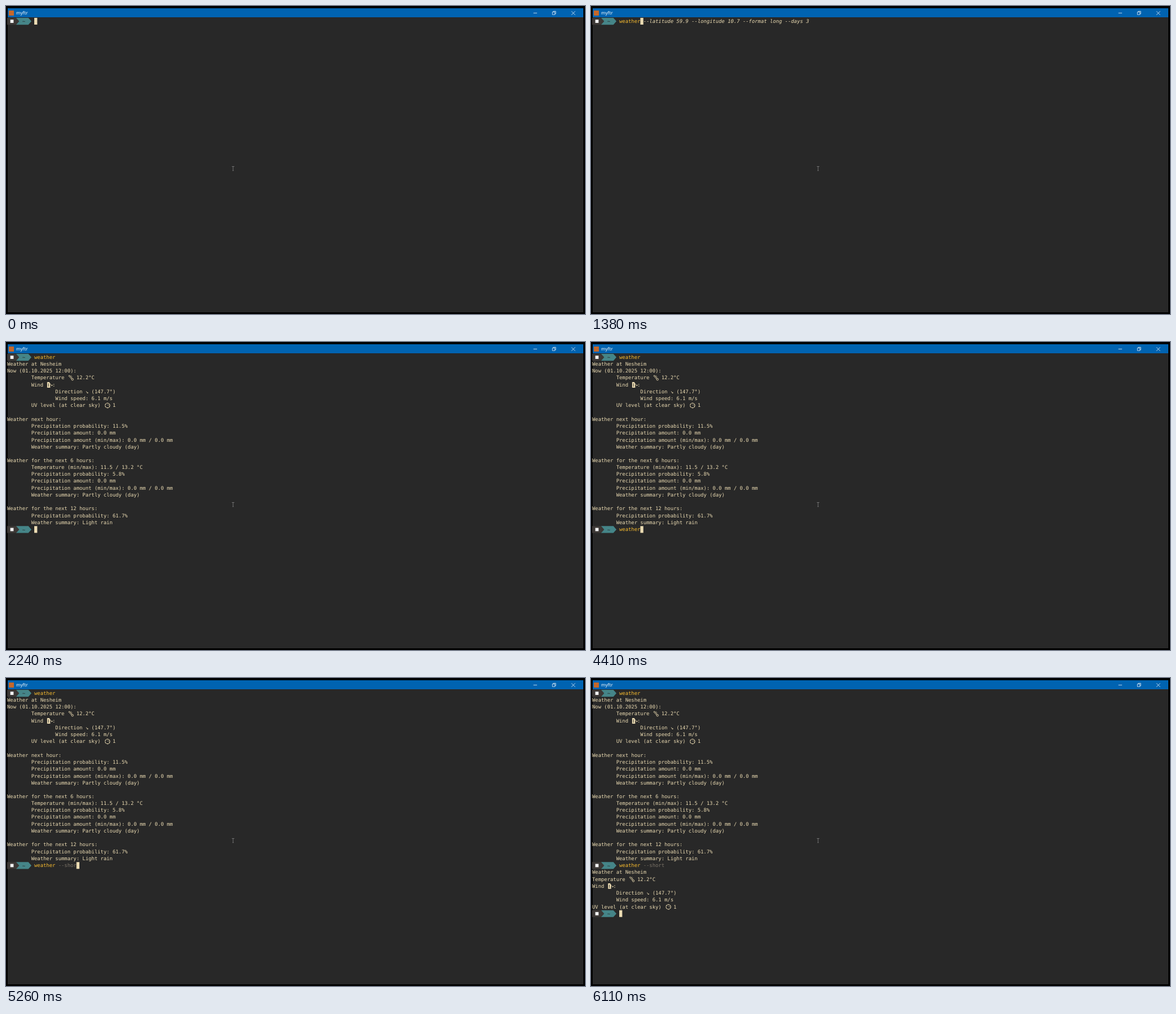
Write an HTML page that moves like this. It is 1025 px wide and 546 px high and loops after 8 s.

```html
<!DOCTYPE html>
<html lang="en">
<head>
<meta charset="utf-8">
<title>Weather in the terminal</title>
<style>
  html, body { margin: 0; width: 100%; height: 100%; overflow: hidden; background: #000; }
  .window { position: absolute; left: 3px; top: 4px; width: 1019px; height: 539px; background: #282828; }
  .bar { position: absolute; left: 0; top: 0; width: 100%; height: 16px; background: #0063b1; }
  .icon { position: absolute; left: 1.5px; top: 3.5px; width: 9.5px; height: 9.5px; background: #c4682c; }
  .title {
    position: absolute; left: 15px; top: 0; line-height: 17px; color: #fff;
    font-family: "Noto Sans", "Open Sans", sans-serif; font-size: 8px; text-rendering: geometricPrecision;
  }
  .overlay { position: absolute; left: 0; top: 0; }

  /* The grid is laid out large, with whole-pixel cells, and scaled down. */
  #screen {
    --row: 27.48px;
    position: absolute; left: 2.3px; top: 20.8px; width: 2280px;
    transform: scale(.444444); transform-origin: 0 0;
    font-family: "DejaVu Sans Mono", "Noto Sans Mono", monospace; font-size: 20px; letter-spacing: -.041px;
    line-height: var(--row); color: #ebdbb2; white-space: pre; text-rendering: geometricPrecision;
  }
  #screen div { height: var(--row); }
  #screen svg { height: var(--row); vertical-align: top; overflow: visible; }
  .prompt { width: 108px; }
  .glyph { width: 24px; }
  .cursor { display: inline-block; width: 12px; height: var(--row); vertical-align: top; background: #ebdbb2; color: #282828; }
  .cmd { color: #fabd2f; }
  .arg { color: #7c7468; }
  .ghost { font-style: italic; }
</style>
</head>
<body>
<div class="window">
  <div class="bar"><div class="icon"></div><div class="title">myftr</div></div>
</div>
<div id="screen"></div>
<svg class="overlay" width="1025" height="546" fill="none">
  <g stroke="#e8f0f8" stroke-width=".8">
    <path d="M933.7 12.5h6.4M1001 9.3l6.6 6.6M1007.6 9.3l-6.6 6.6"/>
    <path d="M967.3 10.7h4.4v4.6h-4.4zM968.8 10.5v-1.2h4.4v4.6h-1.3"/>
  </g>
  <path d="M399.8 284.5h4.4M402 284.5v7.3M400.8 291.8h2.4" stroke="#888" stroke-width=".75"/>
</svg>
<script>
const LOOP = 8000;
const screenEl = document.getElementById('screen');

const PROMPT = `<svg class="prompt" viewBox="0 0 48 12.213">
  <path d="M16 0H37.6L43 6.1L37.6 12.213H16z" fill="#458588"/>
  <path d="M0 0H16L21.4 6.1L16 12.213H0z" fill="#3c3836"/>
  <rect x="5.6" y="3.2" width="5.8" height="5.8" fill="#f2f2f2"/>
  <text x="26.67" y="9.2" font-size="8.86" fill="#282828">~</text></svg>`;

const glyph = body => `<svg class="glyph" viewBox="0 0 10.667 12.213" fill="none" stroke="#ebdbb2" stroke-width=".9">${body}</svg>`;
const GLYPHS = {
  // thermometer, blowing wind, sun
  t: glyph('<path d="M2.2 2.6l1.4-1 5 5.6M2.2 2.6l5 5.6M5.6 3l1.4-.9M7.1 4.8l1.3-.9"/><circle cx="9" cy="8.8" r="1.7"/>'),
  w: glyph(`<path d="M1.5 1.2h3.7l1.8 2.4.6 2.8-.8.8.2 3.8H1.5z" fill="#ebdbb2" stroke="none"/>
    <path d="M4 3.4v6" stroke="#282828"/><path d="M9 5.4l2.6 1.5L9 8.4z" fill="#ebdbb2" stroke="none"/>`),
  s: glyph(`<circle cx="7" cy="6.1" r="4.2" stroke-width="1.1" stroke-dasharray="3.8 .6"/>
    <path d="M6.2 4.6h.8M8.4 4.6h.9M8 6.2h1" stroke-width=".8"/>`)
};

const line = text => text.replace(/@(.)/g, (_, key) => GLYPHS[key]);

const span = (name, text) => `<span class="${name}">${text}</span>`;
const cursor = (char = ' ') => span('cursor', char);

// A prompt with typed text; the cursor sits on the first suggested letter.
function entry(typed = '', { hint = '', active = true } = {}) {
  const cmd = typed.slice(0, 7), arg = typed.slice(7);
  const tail = active ? span('ghost', cursor(hint[0]) + hint.slice(1)) : '';
  return PROMPT + span('cmd', cmd) + span('arg', arg) + tail;
}
const sent = typed => entry(typed, { active: false });

const WORD = 'weather';
const HINT = ' --latitude 59.9 --longitude 10.7 --format long --days 3';
const TAB = '        ';
const indent = rows => rows.map(row => TAB + row);

const place = 'Weather at Nesheim';
const current = [
  'Temperature @t 12.2°C',
  'Wind @w:',
  ...indent(['Direction ↘ (147.7°)', 'Wind speed: 6.1 m/s']),
  'UV level (at clear sky) @s 1'
];
const chance = value => `Precipitation probability: ${value}%`;
const summary = text => `Weather summary: ${text}`;
const dry = ['Precipitation amount: 0.0 mm', 'Precipitation amount (min/max): 0.0 mm / 0.0 mm', summary('Partly cloudy (day)')];

const report = [
  place, 'Now (01.10.2025 12:00):', ...indent(current), '',
  'Weather next hour:', ...indent([chance(11.5), ...dry]), '',
  'Weather for the next 6 hours:', ...indent(['Temperature (min/max): 11.5 / 13.2 °C', chance(5.8), ...dry]), '',
  'Weather for the next 12 hours:', ...indent([chance(61.7), summary('Light rain')])
].map(line);
const brief = [place, ...current].map(line);

const first = [sent(WORD), ...report];
const second = [...first, sent(WORD + ' --short')];

const word = count => [entry(WORD.slice(0, count), { hint: WORD.slice(count) })];
const args = (text, hinted) => [...first, entry(WORD + text, { hint: hinted ? HINT.slice(text.length) : '' })];

const steps = [
  [0, [entry()]],
  ...[500, 670, 850, 1040, 1220, 1300].map((time, i) => [time, word(i + 1)]),
  [1380, [entry(WORD, { hint: HINT })]],
  [1990, [sent(WORD), cursor()]],
  [2150, [...first, cursor()]],
  [2240, [...first, entry()]],
  [4410, args('')],
  [4580, args(' ')],
  [4665, args(' ', true)],
  [4750, args(' -', true)],
  [4835, args(' --', true)],
  [4920, args(' --s', true)],
  [5005, args(' --s')],
  [5090, args(' --sh')],
  [5175, args(' --sho')],
  [5260, args(' --shor')],
  [5430, args(' --short')],
  [5770, [...second, cursor()]],
  [6020, [...second, ...brief, cursor()]],
  [6110, [...second, ...brief, entry()]]
];

let shown = null;
function draw() {
  const time = performance.now() % LOOP;
  const step = steps.findLast(([start]) => start <= time);
  if (step !== shown) {
    screenEl.innerHTML = step[1].map(row => `<div>${row}</div>`).join('');
    shown = step;
  }
  requestAnimationFrame(draw);
}
draw();
</script>
</body>
</html>
```
